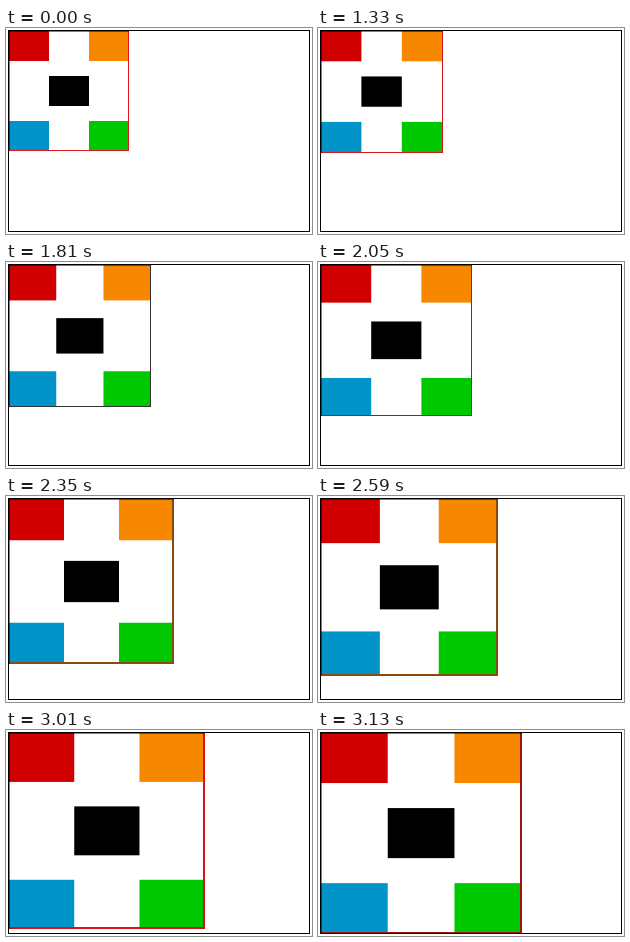
These frames come from a looping animation (306x206 px, 5.33 s). An HTML page with a canvas:

```html
<!DOCTYPE html>
<html lang="en">
<head>
<meta charset="utf-8">
<title>Growing squares</title>
<style>
html, body { margin: 0; width: 100%; height: 100%; overflow: hidden; background: #fff; }
canvas { display: block; }
</style>
</head>
<body>
<canvas id="stage" width="306" height="206"></canvas>
<script>
const ctx = document.getElementById('stage').getContext('2d');
const LOOP = 5330, START = 1330, STEP = 60, LAST = 30, ORIGIN = 3;

// step, side of the square, edge colour, edge width
const keys = [
  [-1, 120, '#e01820', 1],
  [0, 121.2, '#d81820', 1],
  [5, 134.6, '#181818', 1],
  [8, 141.7, '#333', 1],
  [12, 150.6, '#444', 1],
  [17, 165, '#8a4a10', 2],
  [25, 188.2, '#d81018', 2],
  [26, 191.2, '#d81018', 2],
  [LAST, 200.2, '#a01414', 2]
];

// column (thirds), row (eighths), colour
const cells = [
  [0, 0, '#d00000'],
  [2, 0, '#f88700'],
  [1, 3, '#000'],
  [0, 6, '#0094c8'],
  [2, 6, '#00c800']
];

function stateAt(step) {
  const i = keys.findLastIndex(key => key[0] <= step);
  const [from, size, color, width] = keys[i];
  const next = keys[i + 1];
  const grown = next ? (next[1] - size) * (step - from) / (next[0] - from) : 0;
  return { size: size + grown, color, width };
}

function rect(color, x, y, w, h) {
  ctx.fillStyle = color;
  ctx.fillRect(x, y, w, h);
}

function draw(now) {
  const time = now % LOOP;
  const step = Math.max(-1, Math.min(LAST, Math.floor((time - START) / STEP)));
  const { size, color, width } = stateAt(step);
  const end = Math.ceil(ORIGIN + size);

  rect('#fff', 0, 0, 306, 206);
  for (const [col, row, fill] of cells) {
    rect(fill, ORIGIN + col * size / 3, ORIGIN + row * size / 8, size / 3, size / 4);
  }

  rect(color, end - width, ORIGIN, width, end - ORIGIN);
  rect(color, ORIGIN, end - width, end - ORIGIN, width);
  const shade = 'rgba(0,0,0,.5)';
  rect(shade, ORIGIN, ORIGIN, end - ORIGIN, 1);
  rect(shade, ORIGIN, ORIGIN, 1, end - ORIGIN);

  ctx.lineWidth = 1;
  ctx.strokeStyle = '#000';
  ctx.strokeRect(2.5, 2.5, 301, 201);
}

const begin = performance.now();
function frame() {
  draw(performance.now() - begin);
  requestAnimationFrame(frame);
}
frame();
</script>
</body>
</html>
```
